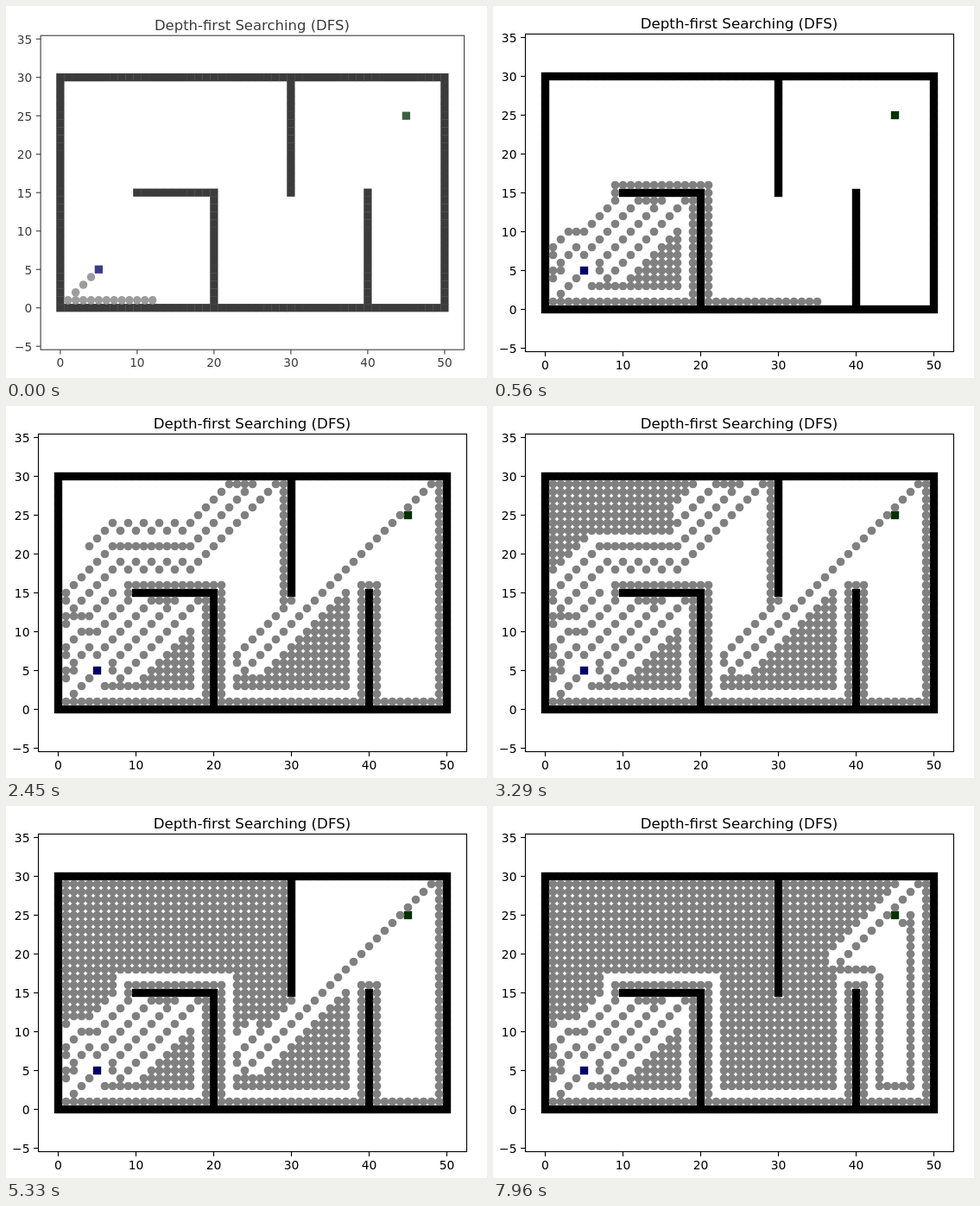
Recreate the animation shown at these times as an HTML page. Size 557x431 px, loop 8 s.

```html
<!DOCTYPE html>
<html lang="en">
<head>
<meta charset="utf-8">
<title>Depth-first Searching (DFS)</title>
<style>
  html, body { margin: 0; width: 100%; height: 100%; overflow: hidden; background: #fff; }
  svg { display: block; width: 557px; height: 431px; }
  text { font: 13.89px "DejaVu Sans", sans-serif; fill: #000; }
  .title { font-size: 16.67px; }
  .axis { fill: none; stroke: #000; stroke-width: 1.11; }
</style>
</head>
<body>
<svg viewBox="0 0 557 431"><g id="plot"></g></svg>
<script>
const LOOP = 8000, BATCH = 15, STEPS = 68, OPENING = 50;
const START = [5, 5], GOAL = [45, 25];
const MOVES = [[-1, 0], [-1, 1], [0, 1], [1, 1], [1, 0], [1, -1], [0, -1], [-1, -1]];

// [batch, time in ms]; batches in between are evenly spaced
const PACE = [[1, 0], [2, 50], [11, 560], [12, 640], [18, 1070], [19, 1150], [25, 1710],
  [26, 1810], [29, 2120], [30, 2220], [38, 3190], [39, 3290], [40, 3420], [46, 4260],
  [47, 4390], [53, 5330], [54, 5460], [59, 6300], [60, 6480], [61, 6660], [66, 7580],
  [67, 7780], [68, 7960]];

const plot = document.getElementById('plot');
const px = x => Math.round(59.545 + 9.01818 * x) + 0.5;
const py = y => Math.floor(351.67 - 9.01818 * y) + 0.5;
const key = (x, y) => x + ',' + y;

function add(parent, tag, attrs, label) {
  const el = document.createElementNS('http://www.w3.org/2000/svg', tag);
  for (const name in attrs) el.setAttribute(name, attrs[name]);
  if (label !== undefined) el.textContent = label;
  return parent.appendChild(el);
}

function square([x, y], fill) {
  const size = 9.38;
  add(plot, 'rect', { x: px(x) - size / 2, y: py(y) - size / 2, width: size, height: size, fill });
}

// Walls
const walls = new Map();
function wall(x0, y0, x1, y1) {
  for (let x = x0; x <= x1; x++)
    for (let y = y0; y <= y1; y++) walls.set(key(x, y), [x, y]);
}
wall(0, 0, 50, 0);
wall(0, 30, 50, 30);
wall(0, 0, 0, 30);
wall(50, 0, 50, 30);
wall(10, 15, 20, 15);
wall(20, 0, 20, 15);
wall(30, 15, 30, 30);
wall(40, 0, 40, 15);

// Visiting order of the search; diagonal moves may not cut wall corners
function search(limit) {
  const blocked = (x, y) => walls.has(key(x, y));
  const stack = [START], seen = new Set([key(...START)]), order = [];
  while (stack.length && order.length <= limit) {
    const [x, y] = stack.pop();
    if (x === GOAL[0] && y === GOAL[1]) break;
    order.push([x, y]);
    for (const [dx, dy] of MOVES) {
      const nx = x + dx, ny = y + dy, id = key(nx, ny);
      if (seen.has(id) || blocked(nx, ny) || blocked(nx, y) || blocked(x, ny)) continue;
      seen.add(id);
      stack.push([nx, ny]);
    }
  }
  return order.slice(1);
}

function drawAxes() {
  for (let x = 0; x <= 50; x += 10) {
    add(plot, 'path', { class: 'axis', d: `M${px(x)} 400.5v5.36` });
    add(plot, 'text', { x: px(x), y: 421, 'text-anchor': 'middle' }, x);
  }
  for (let y = -5; y <= 35; y += 5) {
    add(plot, 'path', { class: 'axis', d: `M37.5 ${py(y)}h-5.36` });
    add(plot, 'text', { x: 27.5, y: py(y) + 5.5, 'text-anchor': 'end' }, String(y).replace('-', '\u2212'));
  }
  add(plot, 'text', { class: 'title', x: 285, y: 26, 'text-anchor': 'middle' }, 'Depth-first Searching (DFS)');
}

drawAxes();
for (const cell of walls.values()) square(cell, '#000');
square(START, '#000064');
square(GOAL, '#003200');

const batches = Array.from({ length: STEPS }, () => add(plot, 'g', { fill: '#808080' }));
search(STEPS * BATCH).forEach(([x, y], i) => {
  const group = batches[Math.floor(i / BATCH)];
  if (group) add(group, 'circle', { cx: px(x), cy: py(y), r: 4.86 });
});
add(plot, 'rect', { class: 'axis', x: 37.5, y: 32.5, width: 496, height: 368 });

const times = batches.map((_, i) => {
  const n = i + 1, k = Math.max(1, PACE.findIndex(p => p[0] >= n));
  const [n0, t0] = PACE[k - 1], [n1, t1] = PACE[k];
  return Math.round((t0 + (t1 - t0) * (n - n0) / (n1 - n0)) / 10) * 10;
});

function render(t) {
  const opening = t < OPENING;
  plot.setAttribute('opacity', opening ? 0.765 : 1);
  plot.setAttribute('transform', opening ? 'translate(275 190) scale(.989) translate(-275 -190)' : '');
  batches.forEach((g, i) => g.setAttribute('display', t >= times[i] ? 'inline' : 'none'));
}

const begin = performance.now();
function tick() {
  render((performance.now() - begin) % LOOP);
  requestAnimationFrame(tick);
}
render(0);
requestAnimationFrame(tick);
</script>
</body>
</html>
```
